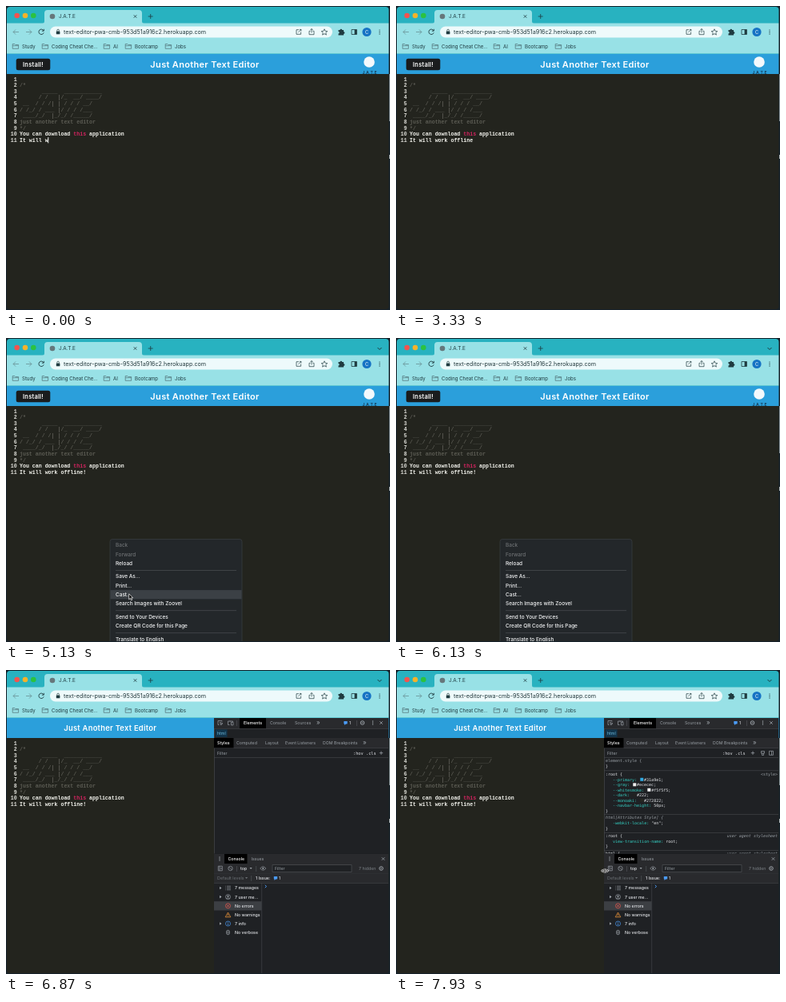
Animation of 480 by 380 pixels, one loop 8000 ms. Source, as an HTML page:

```html
<!DOCTYPE html>
<html lang="en">
<head>
<meta charset="utf-8">
<title>Text editor demo</title>
<style>
  html, body { margin: 0; width: 100%; height: 100%; overflow: hidden; background: #23241e; }
  svg { display: block; }
  text { font-family: Inter, sans-serif; white-space: pre; }
  .code { font-family: "Liberation Mono", monospace; font-weight: bold; }
  .css { font-family: "DejaVu Sans Mono", monospace; }
  .medium { font-weight: 500; }
  .bold { font-weight: 600; letter-spacing: .03em; }
  .mid { text-anchor: middle; }
  .end { text-anchor: end; }
  .italic { font-style: italic; }
</style>
</head>
<body>
<svg id="stage" width="480" height="380" viewBox="0 0 480 380"></svg>
<script>
const LOOP = 8000, STEP = 200 / 3;
const CHAR = 3.96, CODE_X = 17;
const INK = '#1f3b40', FADED = '#6f9a9f', DIM = '#9aa0a6', PALE = '#e4e6ea', TEAL = '#35d4c7';

const rect = (x, y, w, h, fill, r = 0) =>
  `<rect x="${x}" y="${y}" width="${w}" height="${h}" rx="${r}" fill="${fill}"/>`;
const dot = (x, y, r, fill) => `<circle cx="${x}" cy="${y}" r="${r}" fill="${fill}"/>`;
const ring = (x, y, r, color, w = .7) =>
  `<circle cx="${x}" cy="${y}" r="${r}" fill="none" stroke="${color}" stroke-width="${w}"/>`;
const stroke = (d, color, w = .8) =>
  `<path d="${d}" fill="none" stroke="${color}" stroke-width="${w}"/>`;
const shape = (d, fill) => `<path d="${d}" fill="${fill}" fill-rule="evenodd"/>`;
const text = (s, x, y, size, fill, cls = '') =>
  `<text x="${x}" y="${y}" font-size="${size}" fill="${fill}" class="${cls}">${s}</text>`;
const group = (id, ...parts) => `<g id="${id}">${parts.flat().join('')}</g>`;
const cross = (x, y, r, color) =>
  stroke(`M${x - r} ${y - r}l${2 * r} ${2 * r}m0 ${-2 * r}l${-2 * r} ${2 * r}`, color);
const plus = (x, y, r, color) => stroke(`M${x - r} ${y}h${2 * r}M${x} ${y - r}v${2 * r}`, color);
const dots = (x, y, gap, color) => [-gap, 0, gap].map(d => dot(x, y + d, .7, color)).join('');
const gear = (x, y) => ring(x, y, 2.3, DIM, 1) + dot(x, y, .8, DIM);

function browser() {
  const folders = [[11, 'Study'], [48, 'Coding Cheat Che…'], [125, 'AI'], [152, 'Bootcamp'], [202, 'Jobs']];
  return [
    rect(0, 0, 480, 60, '#28b2c0'),
    rect(0, 21.5, 480, 38, '#98e1e6'),
    shape('M45 22q3 0 3-3v-10q0-4 4-4h114q4 0 4 4v10q0 3 3 3z', '#98e1e6'),
    dot(13.7, 12, 3.3, '#f3544f'), dot(24, 12, 3.3, '#f5b32a'), dot(34.3, 12, 3.3, '#2bc240'),
    dot(58, 13, 3.3, '#66777b'),
    text('J.A.T.E', 66, 15.3, 6.4, INK),
    cross(161.5, 13, 1.8, INK), plus(180.7, 13, 3, INK),
    '<g transform="translate(0 -.5)">',
    stroke('M16 33h-7m3-3l-3 3 3 3M25 33h7m-3-3l3 3-3 3', FADED, .9),
    stroke('M47 31.3a3.2 3.2 0 1 0 .2 2.6M47.3 29.3v2.4h-2.4', INK, .9),
    rect(55, 26, 353, 14, '#eefafb', 7),
    rect(62.8, 32, 4.6, 3.8, INK, .6), stroke('M63.8 32v-1a1.3 1.3 0 0 1 2.6 0v1', INK, .7),
    text('text-editor-pwa-cmb-953d51a916c2.herokuapp.com', 72, 35.5, 7.18, '#22383c'),
    stroke('M366 30.2h-3v5.6h5.6v-2.8M365.5 33.3l3.4-3.4m-2 0h2v2', INK, .7),
    stroke('M380.5 31.8h-1.5v4.4h6v-4.4h-1.5M382 34v-5m-1.5 1.5l1.5-1.5 1.5 1.5', INK, .7),
    stroke('M398 29.3l1.1 2.5 2.7.3-2 1.8.6 2.7-2.4-1.4-2.4 1.4.6-2.7-2-1.8 2.7-.3z', INK, .7),
    shape('M415.5 30.5h2a1.3 1.3 0 0 1 2.6 0h2v2.2a1.3 1.3 0 0 1 0 2.6v1.7h-6.6v-2a1.2 1.2 0 0 0 0-2.4z', INK),
    stroke('M432 30h6.4v6h-6.4z', INK), rect(435.6, 30, 2.8, 6, INK),
    dot(451, 33, 5.6, '#1673c4'), text('C', 451, 35.1, 5.6, '#fff', 'mid'),
    dots(467, 33, 2.4, INK),
    '</g>',
    folders.map(([x, name]) =>
      stroke(`M${x - 2.8} 47.5h2.6l1 1h3.8v4.8h-7.4zm0 2.2h7.4`, '#4f7076', .7) + text(name, x + 9, 52.5, 6.05, INK)),
  ].flat().join('');
}

function editor() {
  const art = [
    '/*',
    '       _____  ____________',
    '      / /   |/_  __/ ____/',
    ' __  / / /| | / / / __/',
    '/ /_/ / ___ |/ / / /___',
    ' ____/_/  |_/_/ /_____/',
    'just another text editor',
    '*/',
  ];
  const base = n => 93.6 + 7.63 * (n - 1);
  const code = (s, n, fill) => text(s, CODE_X, base(n), 6.6, fill, 'code');
  return [
    rect(0, 60, 480, 320, '#23241e'),
    Array.from({ length: 11 }, (_, i) => text(i + 1, 13.6, base(i + 1), 6.6, '#deded8', 'code end')),
    art.map((s, i) => code(s, i + 2, '#5c5c54')),
    code('You can download <tspan fill="#d3245f">this</tspan> application', 10, '#f6f6f0'),
    `<text id="typed" class="code" x="${CODE_X}" y="${base(11)}" font-size="6.6" fill="#f6f6f0"></text>`,
    '<rect id="caret" y="164" width=".9" height="7.4" fill="#fff"/>',
    rect(0, 59.5, 480, 25.5, '#2b9fdb'),
    group('wideHeader',
      rect(12.7, 65.7, 42.6, 14.6, '#1a1c1d', 2.5),
      text('Install!', 34, 75.7, 7.5, '#fff', 'bold mid'),
      text('Just Another Text Editor', 248.6, 76.8, 11, '#fff', 'bold mid'),
      dot(454, 70, 6.8, '#f4f9fc'),
      text('J.A.T.E', 454.6, 84.6, 5, '#12324b', 'bold mid')),
    group('narrowHeader', text('Just Another Text Editor', 130.2, 76.3, 9.35, '#fff', 'bold mid')),
  ].flat().join('');
}

const MENU = [
  ['Back', 259], ['Forward', 270.2], ['Reload', 281.4], ['Save As…', 298], ['Print…', 309.5], ['Cast…', 320.7],
  ['Search Images with Zoovel', 331.8], ['Send to Your Devices', 348.8], ['Create QR Code for this Page', 360],
  ['Translate to English', 377],
];

function contextMenu() {
  return group('menu',
    '<rect x="130" y="251.5" width="165" height="140" rx="3" fill="#23272a" stroke="#3b4043" stroke-width=".7"/>',
    '<rect id="hover" x="130.5" width="164" height="11.2" fill="#3b4045"/>',
    [290, 340.4, 368.4].map(y => rect(137, y, 151, .7, '#4b4f52')),
    MENU.map(([s, y], i) => text(s, 137, y + 2.3, 6.45, i < 2 ? '#6d7073' : '#f4f5f6', 'medium')));
}

function devtools() {
  const label = (s, x, y, fill = DIM, cls = '') => text(s, x, y + 1.9, 5.25, fill, cls);
  const more = (x, y) => text('»', x, y + 2.4, 8, DIM);
  const bar = (y, h) => rect(260, y, 218, h, '#292a2d') + rect(260, y + h, 218, .6, '#46484c');
  const badge = (x, y) => rect(x - 2.2, y - 2, 4.4, 3.4, '#4b9bf5', .6) + shape(`M${x - 1.5} ${y + 1}v2l2-2z`, '#4b9bf5');
  const arrow = (x, y) => shape(`M${x} ${y - 1.8}l2.6 1.8-2.6 1.8z`, DIM);
  const drop = (x, y, fill = DIM) => shape(`M${x} ${y - 1}h3.2l-1.6 2z`, fill);
  const levels = [
    ['7 messages', 272.5, stroke('M276 270.3h5m-5 2.2h5m-5 2.2h5m-6.8-4.4h.7m-.7 2.2h.7m-.7 2.2h.7', DIM, .7)],
    ['7 user me…', 283.6, ring(277.5, 283.6, 3, DIM) + dot(277.5, 282.8, 1.1, DIM) + stroke('M275.5 285.7q2-1.8 4 0', DIM)],
    ['No errors', 294.8, ring(277.5, 294.8, 3, '#ee5a50') + cross(277.5, 294.8, 1.2, '#ee5a50')],
    ['No warnings', 306, stroke('M277.5 303l3.3 5.8h-6.6z', '#e8923a') + stroke('M277.5 305v1.8m0 .6v.7', '#e8923a', .7)],
    ['7 info', 317, ring(277.5, 317, 3, '#4b9bf5') + stroke('M277.5 315.2v.8m0 .7v2.2', '#4b9bf5')],
    ['No verbose', 328, `<rect x="275.7" y="325.3" width="3.6" height="5.4" rx="1.7" fill="none" stroke="${DIM}" stroke-width=".8"/>`
      + stroke('M276.2 327.2h2.6m-2.6 1.6h2.6', DIM, .6)],
  ];
  return group('devtools',
    rect(260, 59.5, 218, 321, '#1f2124'), rect(260, 59.5, .7, 321, '#46484c'),
    group('panels',
      bar(59.5, 13.5), rect(292, 59.5, 33, 13.5, '#000'),
      stroke('M270 64.5v-1h-5v5h1.5m1-3l3.5 1.3-1.5.7-.7 1.5z', DIM, .7),
      stroke('M279.5 64h4v1m-6 3.5v-4.5h3m-1 4.5h-2M281.5 65.3h2.5v3.6h-2.5z', DIM, .7),
      rect(288, 63, .6, 7, '#55585c'),
      label('Elements', 297, 66.1, '#fff', 'medium'), label('Console', 330, 66.1), label('Sources', 361, 66.1),
      more(388, 66), badge(424.5, 66), label('1', 429, 66.1, PALE),
      rect(438, 63, .6, 7, '#55585c'), gear(445.5, 66), dots(458.5, 66, 2, DIM), cross(469, 66, 1.8, DIM),
      rect(262, 74.4, 14.5, 9.4, '#12354c'), label('html', 264, 79.1, '#6fb9dc'),
      bar(85, 12.4), rect(260, 85, 24.5, 12.4, '#000'),
      label('Styles', 264, 91.2, '#fff', 'medium'), label('Computed', 288, 91.2), label('Layout', 324, 91.2),
      label('Event Listeners', 349, 91.2), label('DOM Breakpoints', 396, 91.2), more(446, 91),
      label('Filter', 264, 103.8), rect(260, 109.4, 218, .6, '#46484c'),
      group('plainFilter', label(':hov', 434, 103.6, PALE, 'css'), label('.cls', 450, 103.6, PALE, 'css'), plus(469, 103.7, 2.2, DIM)),
      group('styles', styleRules(),
        label(':hov', 408, 103.6, PALE, 'css'), label('.cls', 424, 103.6, PALE, 'css'), plus(446, 103.7, 2.2, DIM),
        stroke('M456.5 101.5h4v2.5h-4zm1 2.5v2.5h2v-2.5', DIM, .7),
        stroke('M466.5 101.3h5v5h-5zm3 0v5', DIM, .7)),
      rect(260, 229.4, 218, 151, '#1f2124'),
      bar(230, 12), rect(273, 230, 28.5, 12, '#000'),
      dots(267, 236, 2, DIM), label('Console', 277.5, 236.1, '#fff', 'medium'), label('Issues', 306.5, 236.1), cross(471.5, 236, 1.8, DIM),
      bar(242, 12),
      stroke('M265.3 245.2h5v5.6h-5zm1.7 0v5.6m3-2.8h-2', DIM, .7),
      ring(280.5, 248, 2.7, DIM), stroke('M278.7 246.2l3.6 3.6', DIM, .7),
      rect(288, 245, .6, 7, '#55585c'), label('top', 293, 248, PALE, 'medium'), drop(304.5, 248),
      rect(312.5, 245, .6, 7, '#55585c'),
      stroke('M317.7 248q3.6-4.4 7.2 0q-3.6 4.4-7.2 0z', DIM, .7), dot(321.3, 248, 1.1, DIM),
      '<rect x="333" y="243.7" width="99" height="8.8" fill="#1f2124" stroke="#55585c" stroke-width=".6"/>',
      label('Filter', 336, 248.2), label('7 hidden', 441, 248.2, '#7d8287'), gear(469, 248),
      bar(254.4, 11.6),
      label('Default levels', 264, 260, '#6b7075'), drop(299, 260, '#6b7075'), rect(306.5, 257, .6, 7, '#55585c'),
      label('1 Issue:', 312, 260, PALE, 'medium'), badge(337, 260), label('1', 341, 260, PALE),
      rect(319.5, 266, .6, 114, '#46484c'), stroke('M323.8 268.8l1.8 1.7-1.8 1.7', '#4b9bf5', 1),
      group('levels', rect(260, 289.2, 59.5, 11.3, '#3c3f43'),
        levels.map(([s, y, icon], i) =>
          icon + label(s, 286, y, PALE, 'medium') + ([0, 1, 4].includes(i) ? arrow(267, y) : '')))));
}

function styleRules() {
  const css = (s, x, y, fill = PALE, cls = '') => text(s, x, y + 1.8, 5, fill, 'css ' + cls);
  const vars = [['--primary:', '#31a9e1'], ['--gray:', '#ececec'], ['--whitesmoke:', '#f5f5f5'],
    ['--dark:', '#222'], ['--monoaki:', '#272822']];
  const prop = (name, value, y) => css(`${name} <tspan fill="${PALE}">${value};</tspan>`, 271, y, TEAL);
  const origin = y => css('user agent stylesheet', 477, y, DIM, 'end italic');
  return [
    css('element.style {', 262, 113.6, DIM), css('}', 262, 120.4),
    css(':root {', 262, 130), css('&lt;style&gt;', 477, 130, DIM, 'end'),
    vars.map(([name, color], i) => {
      const y = 136.8 + 6.5 * i, x = 271 + 3.01 * name.length;
      return css(name, 271, y, TEAL) + rect(x + 4.2, y - 2, 4, 4, color) + css(color + ';', x + 9, y);
    }),
    prop('--navbar-height:', '50px', 169.4), css('}', 262, 176),
    css('html[Attributes Style] {', 262, 184.6, DIM, 'italic'),
    prop('-webkit-locale:', '"en"', 191.2), css('}', 262, 197.8),
    css(':root {', 262, 207.4), origin(207.4),
    prop('view-transition-name:', 'root', 214), css('}', 262, 220.6),
    css('html {', 262, 229.6), origin(229.6),
    [125.5, 180, 203, 225].map(y => rect(260, y, 218, .6, '#46484c')),
  ].flat().join('');
}

const stage = document.getElementById('stage');
stage.innerHTML = [
  editor(),
  group('highlight',
    rect(1, 60, 259, 177.5, 'rgba(95,145,200,.66)'),
    shape('M6 242.5l5-5 5 5z', '#fff'), rect(1, 242, 56.5, 14, '#fff', 2),
    text('html', 6, 251.3, 6.2, '#7b1a78', 'bold'), text('511 × 350', 24, 251.3, 6.2, '#5b6064')),
  contextMenu(), devtools(), browser(),
  group('tabSearch', stroke('M464.5 12l2.5 2.5 2.5-2.5', INK, 1)),
  // Dark desktop around the rounded window.
  shape('M0 0h480v380h-480zM5 1h469.5q4 0 4 4v370q0 4-4 4h-469.5q-4 0-4-4v-370q0-4 4-4z', '#17222a'),
  rect(479, 85, 1, 59, '#8d979c'), rect(479, 186, 1, 5, '#b4babd'),
  group('pointer', '<path d="M0 0v7l1.6-1.5 1.2 2.6 1.2-.5-1.2-2.6h2.2z" fill="#000" stroke="#fff" stroke-width=".7"/>'),
  group('resize', [['#fff', 1.8], ['#111', .7]].map(([color, w]) =>
    stroke('M260.4 248.5v5m1.4-5v5M260.4 251h-3m1.3-1.3l-1.3 1.3 1.3 1.3M261.8 251h3m-1.3-1.3l1.3 1.3-1.3 1.3', color, w))),
].join('');

const el = {};
stage.querySelectorAll('[id]').forEach(node => el[node.id] = node);
const show = (id, on) => el[id].style.display = on ? '' : 'none';

const PHRASE = 'It will work offline!';
const KEYS = [130, 270, 400, 530, 730, 930, 1070, 1200, 1400, 1600, 1730, 3530];
// Pointer trips as [time, x, y] points; hidden between trips.
const TRIPS = [
  [[3930, 112, 322], [4400, 123, 266], [4600, 128, 265], [5000, 128, 265], [5270, 180, 376], [5670, 180, 376]],
  [[7320, 185, 377.5], [7600, 228, 312], [7870, 266, 263], [7930, 266, 263]],
];

function pointerAt(t) {
  const trip = TRIPS.find(p => t >= p[0][0] && t < p[p.length - 1][0]);
  if (!trip) return null;
  const i = trip.findIndex(p => p[0] > t), [t0, x0, y0] = trip[i - 1], [t1, x1, y1] = trip[i];
  const k = (t - t0) / (t1 - t0);
  return [x0 + (x1 - x0) * k, y0 + (y1 - y0) * k];
}

function draw(t) {
  const pressed = KEYS.filter(k => k <= t), length = 9 + pressed.length;
  const lastKey = pressed.length ? pressed[pressed.length - 1] : 0;
  el.typed.textContent = PHRASE.slice(0, length);
  el.caret.setAttribute('x', CODE_X + length * CHAR - .3);
  show('caret', t < 4870 && (t - lastKey) % 1066 < 533);

  const narrow = t >= 6600;
  show('wideHeader', !narrow);
  show('narrowHeader', narrow);
  show('tabSearch', t >= 3930);
  show('menu', t >= 4870 && t < 6530);
  show('devtools', narrow);
  show('panels', t >= 6670);
  show('levels', t >= 6870);
  show('plainFilter', t < 7070);
  show('styles', t >= 7070);
  show('highlight', t >= 6930 && t < 7470);
  show('resize', t >= 7930);

  const spot = pointerAt(Math.floor((t + 4) / STEP) * STEP);
  show('pointer', spot);
  if (spot) el.pointer.setAttribute('transform', `translate(${spot})`);
  const row = spot && spot[0] > 130 && MENU.find(([, y], i) => i > 1 && Math.abs(spot[1] - y) < 5.6);
  show('hover', row);
  if (row) el.hover.setAttribute('y', row[1] - 5.6);
}

(function tick() {
  draw(performance.now() % LOOP);
  requestAnimationFrame(tick);
})();
</script>
</body>
</html>
```
